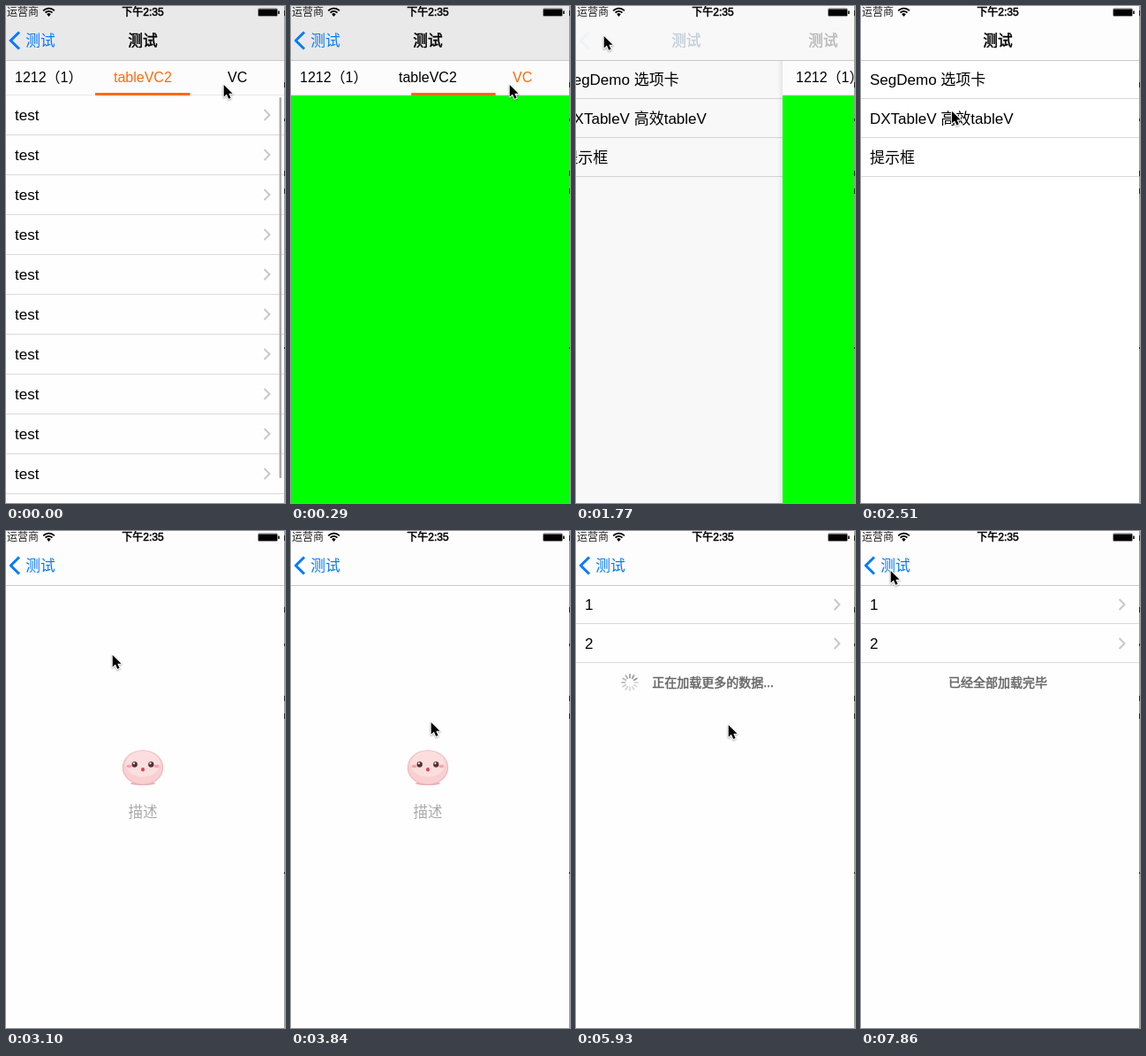
Animation, 316 px wide and 561 px high, one loop 8000 ms. Source, as an HTML page with a canvas:

```html
<!DOCTYPE html>
<html lang="zh-CN">
<head>
<meta charset="utf-8">
<title>Tabs and table demo</title>
<style>
html, body { margin: 0; width: 100%; height: 100%; overflow: hidden; background: #fff; }
canvas { display: block; width: 316px; height: 561px; }
</style>
</head>
<body>
<canvas id="stage"></canvas>
<script>
const W = 316, H = 561, LOOP = 8000, STEP = LOOP / 54;
const NAV = 61, MID = 155, BLUE = '#007aff', ORANGE = '#ff6a0c';
const FONT = '"Liberation Sans", "Noto Sans CJK SC", "Noto Sans CJK", sans-serif';

const canvas = document.getElementById('stage');
const ctx = canvas.getContext('2d');
const ratio = window.devicePixelRatio || 1;
canvas.width = W * ratio;
canvas.height = H * ratio;

// time, x, y of the pointer tip
const path = [
  [0, 246, 88], [296, 247, 88], [520, 247, 88], [1185, 32, 34], [1333, 31, 33],
  [2150, 31, 33], [2667, 120, 139], [3300, 120, 139], [3850, 158, 215],
  [4000, 158, 215], [4400, 163, 328], [4592, 163, 308], [5050, 166, 172],
  [5780, 168, 172], [5926, 172, 218], [6074, 176, 256], [6250, 176, 256],
  [6667, 157, 172], [7290, 157, 172], [7852, 33, 44]
];

const mix = (a, b, p) => a + (b - a) * p;
const clamp = v => Math.max(0, Math.min(1, v));
const ease = v => { v = clamp(v); return v * v * (3 - 2 * v); };
const span = (t, from, to) => ease((t - from) / (to - from));
const settle = (t, start, tau, end) =>
  t < start ? 0 : t > end ? 1 : 1 - Math.exp((start - t) / tau);

function rect(x, y, w, h, color) {
  ctx.fillStyle = color;
  ctx.fillRect(x, y, w, h);
}

// a thin outline gives a weight between regular and bold
function text(str, x, cy, size, color, align = 'left', outline = 0) {
  const y = cy + size * 0.355;
  ctx.font = `${size}px ${FONT}`;
  ctx.textAlign = align;
  ctx.fillStyle = color;
  ctx.fillText(str, x, y);
  if (outline) {
    ctx.strokeStyle = color;
    ctx.lineWidth = outline;
    ctx.lineJoin = 'round';
    ctx.strokeText(str, x, y);
  }
}

function line(points, color, width) {
  ctx.beginPath();
  points.forEach(([x, y]) => ctx.lineTo(x, y));
  ctx.strokeStyle = color;
  ctx.lineWidth = width;
  ctx.stroke();
}

function oval(x, y, rx, ry, color) {
  ctx.beginPath();
  ctx.ellipse(x, y, rx, ry, 0, 0, Math.PI * 2);
  ctx.fillStyle = color;
  ctx.fill();
}

function faded(alpha, draw) {
  ctx.save();
  ctx.globalAlpha = clamp(alpha);
  draw();
  ctx.restore();
}

function arrow(y) {
  line([[292.5, y - 6], [298.5, y], [292.5, y + 6]], '#c7c7cc', 2);
}

function row(label, top, height, chevron = true) {
  text(label, 10, top + 22, 17, '#000');
  rect(0, top + height - 1, W, 1, '#dadada');
  if (chevron) arrow(top + 22);
}

function spinner(x, y, t) {
  const head = Math.floor(t / 83);
  for (let i = 0; i < 12; i++) {
    const a = i * Math.PI / 6, age = (head - i + 1200) % 12;
    faded(mix(0.75, 0.25, Math.min(1, age / 8)), () => {
      const c = Math.cos(a), s = Math.sin(a);
      ctx.lineCap = 'round';
      line([[x + c * 5.5, y + s * 5.5], [x + c * 9, y + s * 9]], '#777', 2);
    });
  }
}

function tabsPage(t) {
  rect(0, NAV, W, H - NAV, '#fefefe');
  const picked = t > 140 ? 2 : 1;
  const shift = 5 * span(t, 400, 600);
  const slide = span(t, 176, 526);
  const tabs = [['1212（1）', 10], ['tableVC2', 122], ['VC', 251]];

  if (picked === 1) {
    for (let i = 0; i < 10; i++) row('test', 101 + i * 45, 45);
    ctx.beginPath();
    ctx.roundRect(309.5, 103, 2.5, 430, 1.2);
    ctx.fillStyle = '#a9a9a9';
    ctx.fill();
  } else {
    rect(0, 101, W, H - 101, '#00ff00');
  }
  rect(0, NAV, W, 40, '#fcfcfc');
  rect(0, 100, W, 1, '#e9e9e9');
  tabs.forEach(([label, x], i) =>
    text(label, x + shift, 80, 16, i === picked ? ORANGE : '#000'));
  const left = mix(101, 230, slide), right = mix(208.5, 293, slide);
  rect(left + shift, 98, right - left, 3, ORANGE);
}

function menuPage() {
  rect(0, NAV, W, H - NAV, '#fff');
  ['SegDemo 选项卡', 'DXTableV 高效tableV', '提示框']
    .forEach((label, i) => row(label, NAV + i * 44, 44, false));
}

function emptyPage() {
  oval(MID, 285, 14, 2, '#e9b4ba');
  oval(MID, 267, 23.2, 19.8, '#eeb0b5');
  oval(MID, 266.7, 22.3, 19, '#f9cfd2');
  oval(MID, 263, 19.5, 14.5, '#fcdedf');
  for (const side of [-1, 1]) {
    oval(MID + side * 15.5, 265.5, 3, 1.8, '#f5a3b1');
    oval(MID + side * 9.3, 263.5, 3.1, 3.3, '#51302f');
    oval(MID + side * 9.3 - 0.8, 262.3, 1.1, 1.1, '#fff');
  }
  oval(MID, 269.3, 2, 2.3, '#d94459');
  text('描述', MID, 317, 16.5, '#aaa', 'center');
}

function dataPage(t) {
  rect(0, NAV, W, H - NAV, '#fefefe');
  const pull = 53 * (span(t, 3950, 4350) - span(t, 4680, 5030));
  const top = NAV + Math.round(pull);
  const note = (str, y) => text(str, MID, y, 14, '#666', 'center', 0.5);

  if (pull > 0) {
    note('下拉可以刷新', top - 40);
    note('最后更新：今天 14:35', top - 13);
    if (t > 4280) spinner(61, top - 27, t);
  }
  if (t < 4500) {
    emptyPage();
    return;
  }
  row('1', top, 44);
  row('2', top + 44, 44);
  const foot = top + 110;
  if (t < 5180) {
    note('点击或上拉加载更多', foot);
  } else if (t < 6060) {
    spinner(61, foot, t);
    note('正在加载更多的数据...', foot);
  } else {
    note('已经全部加载完毕', foot);
  }
}

function shifted(x, draw) {
  ctx.save();
  ctx.translate(x, 0);
  draw();
  ctx.restore();
}

// the upper page sits at x and casts a soft shadow on the one below
function stack(x, lower, upper) {
  const far = x / W;
  if (x > 0) {
    shifted(-95 * (1 - far), lower);
    rect(0, NAV, x, H - NAV, `rgba(0,0,0,${0.1 * (1 - far)})`);
  }
  if (x > 0 && x < W) {
    const g = ctx.createLinearGradient(x - 6, 0, x, 0);
    g.addColorStop(0, 'rgba(0,0,0,0)');
    g.addColorStop(1, 'rgba(0,0,0,0.07)');
    ctx.fillStyle = g;
    ctx.fillRect(x - 6, NAV, 6, H - NAV);
  }
  if (x < W) shifted(x, upper);
}

// out = 0: back button shown, out = 1: its label has become the title
function navBar(out, tone, hasTitle) {
  rect(0, 0, W, NAV, `rgb(${tone},${tone},${tone})`);
  rect(0, NAV, W, 1, '#c9c9c9');
  const x = mix(39, MID, out);
  const title = (tx, alpha) => faded(alpha, () =>
    text('测试', tx, 39, 16.7, '#000', 'center', 0.5));
  faded((1 - out) ** 2.5, () => line([[15, 29.5], [5.3, 39], [15, 48.5]], BLUE, 3));
  faded(out ? (1 - out) * 0.5 : 1, () => text('测试', x, 39, 16.7, BLUE, 'center'));
  title(x, out ** 8);
  if (hasTitle) title(mix(MID, 324, out), (1 - out) ** 1.2);
}

function statusBar() {
  text('运营商', 1, 7, 12, '#222');
  text('下午2:35', MID, 7, 12, '#000', 'center', 0.5);
  for (const r of [8.4, 5.2]) {
    ctx.beginPath();
    ctx.arc(48.5, 11, r, -Math.PI * 0.77, -Math.PI * 0.23);
    ctx.strokeStyle = '#000';
    ctx.lineWidth = 1.8;
    ctx.stroke();
  }
  ctx.beginPath();
  ctx.moveTo(48.5, 12);
  ctx.arc(48.5, 11, 2.8, -Math.PI * 0.8, -Math.PI * 0.2);
  ctx.fillStyle = '#000';
  ctx.fill();
  ctx.beginPath();
  ctx.roundRect(285.5, 2.8, 22, 8.8, 1.5);
  ctx.strokeStyle = '#777';
  ctx.lineWidth = 0.8;
  ctx.stroke();
  rect(286, 3.5, 21, 7.5, '#000');
  rect(308.2, 5.5, 1.5, 3.5, '#000');
}

function edge() {
  rect(315, 0, 1, H, '#9a9a9a');
  [[5, 6], [86, 6], [127, 3], [186, 6], [206, 6], [385, 2]]
    .forEach(([y, h]) => rect(315, y, 1, h, '#222'));
}

function pointer(t) {
  let i = 0;
  while (i < path.length - 2 && t > path[i + 1][0]) i++;
  const [t0, x0, y0] = path[i], [t1, x1, y1] = path[i + 1];
  const p = span(t, t0, t1);
  ctx.save();
  ctx.translate(mix(x0, x1, p), mix(y0, y1, p));
  ctx.beginPath();
  [[0.7, 1], [0.7, 14.5], [3.9, 11.6], [6.2, 16.8], [8.6, 15.8], [6.3, 10.7], [10.6, 10.7]]
    .forEach(([x, y]) => ctx.lineTo(x, y));
  ctx.closePath();
  ctx.lineJoin = 'round';
  ctx.shadowColor = 'rgba(0,0,0,0.35)';
  ctx.shadowBlur = 2 * ratio;
  ctx.shadowOffsetY = ratio;
  ctx.strokeStyle = '#fff';
  ctx.lineWidth = 2;
  ctx.stroke();
  ctx.shadowColor = 'transparent';
  ctx.fillStyle = '#000';
  ctx.fill();
  ctx.restore();
}

function draw(t) {
  ctx.setTransform(ratio, 0, 0, ratio, 0, 0);
  rect(0, 0, W, H, '#fefefe');
  const pop = settle(t, 1600, 132, 2250);
  const push = settle(t, 2700, 100, 3090);
  if (t < 2700) {
    stack(Math.round(W * pop), menuPage, () => tabsPage(t));
    navBar(pop, Math.round(mix(233, 253, pop)), true);
  } else {
    stack(Math.round(W * (1 - push)), menuPage, () => dataPage(t));
    navBar(1 - push, 253, false);
  }
  statusBar();
  edge();
  pointer(t);
}

// the picture advances in even steps, about seven a second
function tick(now) {
  const t = now % LOOP;
  draw(Math.min(53, Math.floor((t + 12) / STEP)) * STEP);
  requestAnimationFrame(tick);
}
requestAnimationFrame(tick);
</script>
</body>
</html>
```
